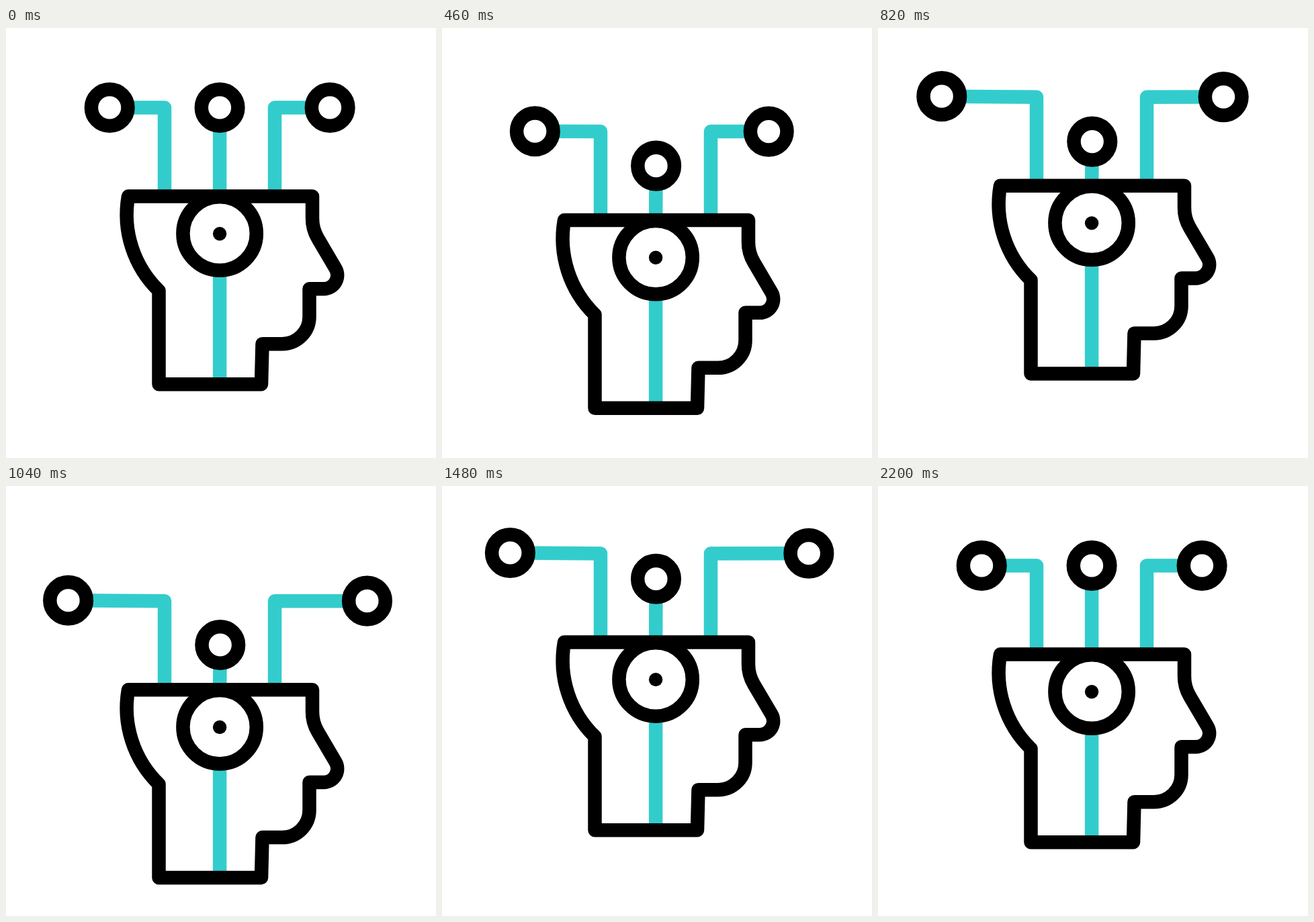
Animation, 640 px wide and 640 px high, one loop 2400 ms. Source, as an HTML page with a canvas:

```html
<!DOCTYPE html>
<html lang="en">
<head>
<meta charset="utf-8">
<title>Connected mind</title>
<style>
  html, body { margin: 0; width: 100%; height: 100%; overflow: hidden; background: #fff; }
  canvas { display: block; width: 100vmin; height: 100vmin; }
</style>
</head>
<body>
<canvas id="stage" width="640" height="640"></canvas>
<script>
const ctx = document.getElementById('stage').getContext('2d');
const LOOP = 2400, STEP = 20, END = 2200;
const BLACK = '#000', TEAL = '#33cccc', WHITE = '#fff';
const TOP = 250.5, NODE_Y = 118.5, MID_X = 318.1;

const head = new Path2D(`M182 ${TOP} H456 V283 A58 58 0 0 0 464.2 313.2
  L490.3 357.6 A20.2 20.2 0 0 1 473 388.2 H451.5 V429.7
  A40.5 40.5 0 0 1 411 470.2 H381.5 L380 530.2 H227.5 V391
  A158 158 0 0 1 182 ${TOP} Z`);

const smooth = u => u * u * (3 - 2 * u);

// Cubic bezier ease (0.8, 0, 0.2, 1), solved by bisection.
function sharp(x) {
  let lo = 0, hi = 1;
  for (let i = 0; i < 24; i++) {
    const s = (lo + hi) / 2, r = 1 - s;
    if (2.4 * s * r * r + 0.6 * s * s * r + s * s * s < x) lo = s; else hi = s;
  }
  return smooth(lo);
}

// Keys are [time, value] pairs.
function tween(keys, t, ease) {
  for (let i = 1; i < keys.length; i++) {
    const [t0, a] = keys[i - 1], [t1, b] = keys[i];
    if (t < t1) return a + (b - a) * ease((t - t0) / (t1 - t0));
  }
  return keys[keys.length - 1][1];
}

const BOB = [[0, 0], [356, 54.3], [711, -36], [1067, 54.3], [1422, -20.3], [1800, 15.1], [2150, 0]];
const outAndBack = (t, peak) => tween([[0, 0], [peak, 1], [END, 0]], t, sharp);

function line(color, ...points) {
  ctx.strokeStyle = color;
  ctx.beginPath();
  points.forEach(([x, y]) => ctx.lineTo(x, y));
  ctx.stroke();
}

function ring(x, y, radius) {
  ctx.beginPath();
  ctx.arc(x, y, radius, 0, Math.PI * 2);
  ctx.fillStyle = WHITE;
  ctx.fill();
  ctx.strokeStyle = BLACK;
  ctx.stroke();
}

function draw(t) {
  const l = outAndBack(t, 1055), m = outAndBack(t, 800), r = outAndBack(t, 1640);
  const left = [154.2 - 61.6 * l, NODE_Y - 1.1 * l];
  const mid = [MID_X + 0.7 * m, NODE_Y + 66.4 * m];
  const right = [482.1 + 64.1 * r, NODE_Y - 0.2 * r];

  ctx.setTransform(1, 0, 0, 1, 0, 0);
  ctx.fillStyle = WHITE;
  ctx.fillRect(0, 0, 640, 640);
  ctx.translate(0, tween(BOB, t, smooth));
  ctx.lineWidth = 20.5;
  ctx.lineJoin = 'round';

  line(TEAL, left, [236, NODE_Y], [236, TOP]);
  line(TEAL, right, [400, NODE_Y], [400, TOP]);
  line(TEAL, mid, [MID_X, TOP]);
  line(TEAL, [MID_X, 306], [MID_X, 530]);

  ctx.strokeStyle = BLACK;
  ctx.stroke(head);
  ring(MID_X, 306, 54.7);
  ctx.fillStyle = BLACK;
  ctx.beginPath();
  ctx.arc(MID_X, 306.2, 10.2, 0, Math.PI * 2);
  ctx.fill();

  for (const [x, y] of [left, mid, right]) ring(x, y, 27.3);
}

function tick() {
  const t = performance.now() % LOOP;
  draw(Math.min(Math.floor(t / STEP) * STEP, END));
  requestAnimationFrame(tick);
}
tick();
</script>
</body>
</html>
```
